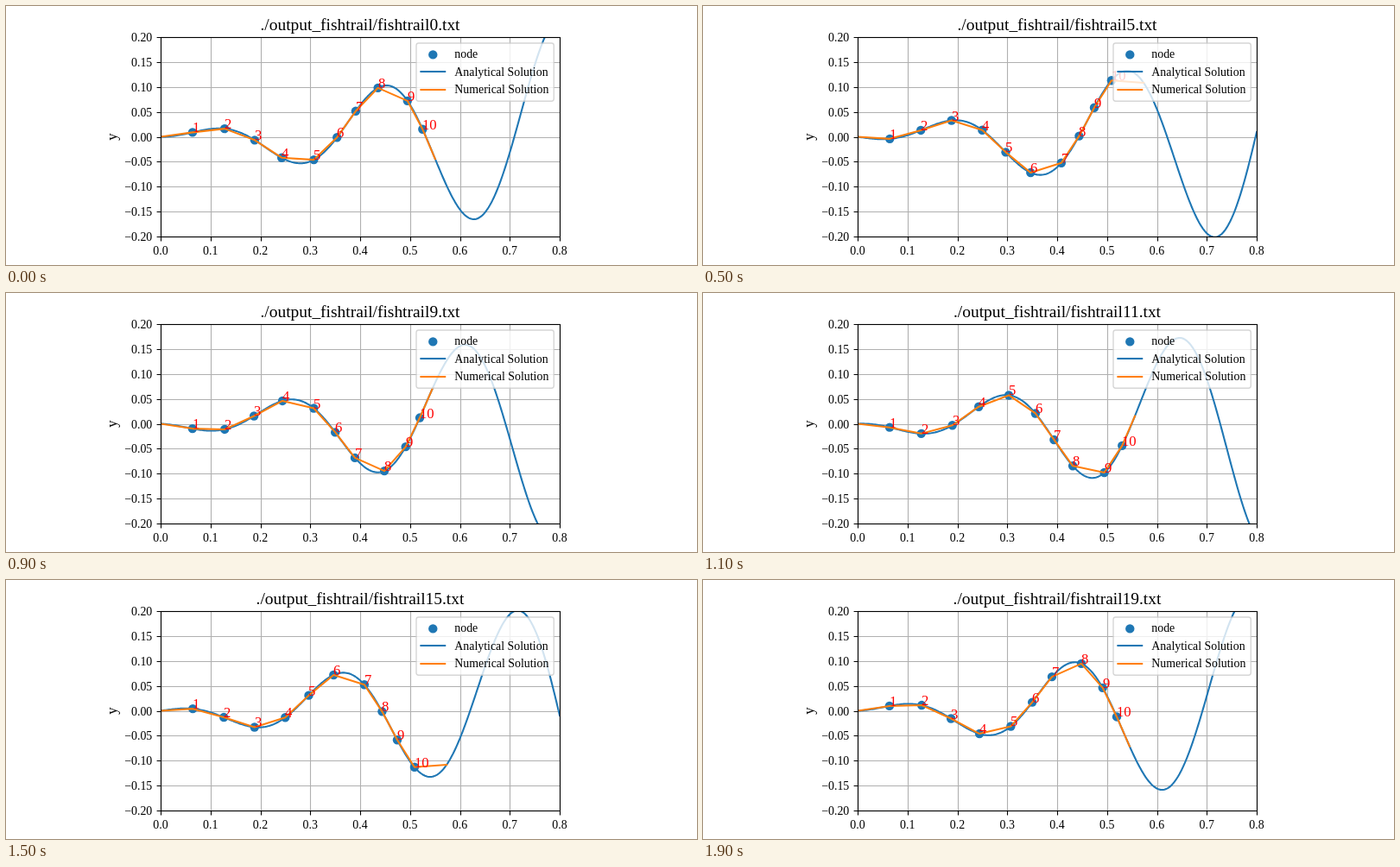
Animation of 800x300 px, one loop 2000 ms. Source, as an HTML page:

```html
<!DOCTYPE html>
<html lang="en">
<head>
<meta charset="utf-8">
<title>Travelling wave</title>
<style>
  html, body { margin: 0; width: 100%; height: 100%; overflow: hidden; background: #fff; }
  svg { display: block; width: 800px; height: 300px; }
  text { font: 13.89px "Liberation Serif", "Times New Roman", serif; }
  .title { font-size: 19.44px; text-anchor: middle; }
  .axis-name { font-size: 16.67px; text-anchor: middle; }
  .tag { font-size: 16.67px; fill: #f00; }
  .grid { stroke: #b0b0b0; stroke-width: 1.11; }
  .frame { fill: none; stroke: #000; stroke-width: 1.11; }
  .line { fill: none; stroke-width: 2.08; stroke-linecap: square; stroke-linejoin: round; }
  .exact { stroke: #1f77b4; }
  .chain { stroke: #ff7f0e; }
  .dot { fill: #1f77b4; }
</style>
</head>
<body>
<svg viewBox="0 0 800 300">
  <clipPath id="plot"><rect x="179" y="36" width="462" height="231"/></clipPath>
  <g id="grid"></g>
  <g clip-path="url(#plot)">
    <g id="dots"></g>
    <path id="exact" class="line exact"/>
    <path id="chain" class="line chain"/>
  </g>
  <g id="axes"><rect class="frame" x="179.5" y="36.5" width="462" height="231"/></g>
  <text class="title" id="title" x="410" y="28"></text>
  <text class="axis-name" transform="translate(127.5 151.5) rotate(-90)">y</text>
  <g id="tags"></g>
  <g id="legend">
    <rect x="475" y="43" width="159.3" height="67.3" rx="2.8" fill="#fff" stroke="#ccc" stroke-width="1.39" opacity=".8"/>
    <circle class="dot" cx="494.3" cy="56.4" r="5.2"/>
    <path class="line exact" d="M480.4 76H508.2"/>
    <path class="line chain" d="M480.4 97H508.2"/>
    <text x="519.3" y="60">node</text>
    <text x="519.3" y="80.5">Analytical Solution</text>
    <text x="519.3" y="101">Numerical Solution</text>
  </g>
</svg>
<script>
const SCALE = 577.5, LEFT = 179, MID = 151.5;
const STEPS = 20, STEP_MS = 100;
const WAVE_NUMBER = 17.72, LINK = 0.0646, NODES = 10;

const byId = id => document.getElementById(id);
const px = x => LEFT + SCALE * x;
const py = y => MID - SCALE * y;
const snap = v => Math.floor(v + 0.5) + 0.5;

function add(parent, tag, attrs, text = "") {
  const el = document.createElementNS("http://www.w3.org/2000/svg", tag);
  for (const key in attrs) el.setAttribute(key, attrs[key]);
  el.textContent = text;
  return byId(parent).appendChild(el);
}

for (let i = 0; i <= 8; i++) {
  const x = snap(px(i / 10)), y = snap(36 + 28.875 * i);
  const value = 0.2 - i * 0.05;
  const label = (i > 4 ? "\u2212" : "") + Math.abs(value).toFixed(2);
  add("grid", "path", { class: "grid", d: `M${x} 36V267M179 ${y}H641` });
  add("axes", "path", { class: "frame", d: `M${x} 267.5v4.9M179.5 ${y}h-4.9` });
  add("axes", "text", { x: px(i / 10), y: 287.5, "text-anchor": "middle" }, (i / 10).toFixed(1));
  add("axes", "text", { x: 169.3, y: y + 4.5, "text-anchor": "end" }, label);
}

const dots = [], tags = [];
for (let i = 1; i <= NODES; i++) {
  dots.push(add("dots", "circle", { class: "dot", r: 5.2 }));
  tags.push(add("tags", "text", { class: "tag" }, i));
}

// Wave running to the right under a growing envelope
const wave = (x, phase) => (0.14 * x + 0.2 * x * x) * Math.sin(WAVE_NUMBER * x - phase);

// Next point on the wave at one link's distance from x
function nextNode(x, phase) {
  const y = wave(x, phase);
  let near = x, far = x + LINK;
  for (let i = 0; i < 30; i++) {
    const mid = (near + far) / 2;
    if (Math.hypot(mid - x, wave(mid, phase) - y) < LINK) near = mid;
    else far = mid;
  }
  return far;
}

const pathOf = (xs, phase) =>
  "M" + xs.map(x => px(x).toFixed(2) + " " + py(wave(x, phase)).toFixed(2)).join("L");

const samples = Array.from({ length: 321 }, (_, i) => i / 400);

function draw(step) {
  const phase = 2 * Math.PI * step / STEPS;
  const nodes = [0];
  while (nodes.length < NODES + 2) nodes.push(nextNode(nodes[nodes.length - 1], phase));

  byId("title").textContent = `./output_fishtrail/fishtrail${step}.txt`;
  byId("exact").setAttribute("d", pathOf(samples, phase));
  byId("chain").setAttribute("d", pathOf(nodes, phase));
  dots.forEach((dot, i) => {
    const x = px(nodes[i + 1]), y = py(wave(nodes[i + 1], phase));
    dot.setAttribute("cx", x);
    dot.setAttribute("cy", y);
    tags[i].setAttribute("x", Math.round(x));
    tags[i].setAttribute("y", Math.round(y));
  });
}

let shown = -1;
function tick() {
  const step = Math.floor(performance.now() / STEP_MS) % STEPS;
  if (step !== shown) draw(shown = step);
  requestAnimationFrame(tick);
}
tick();
</script>
</body>
</html>
```
